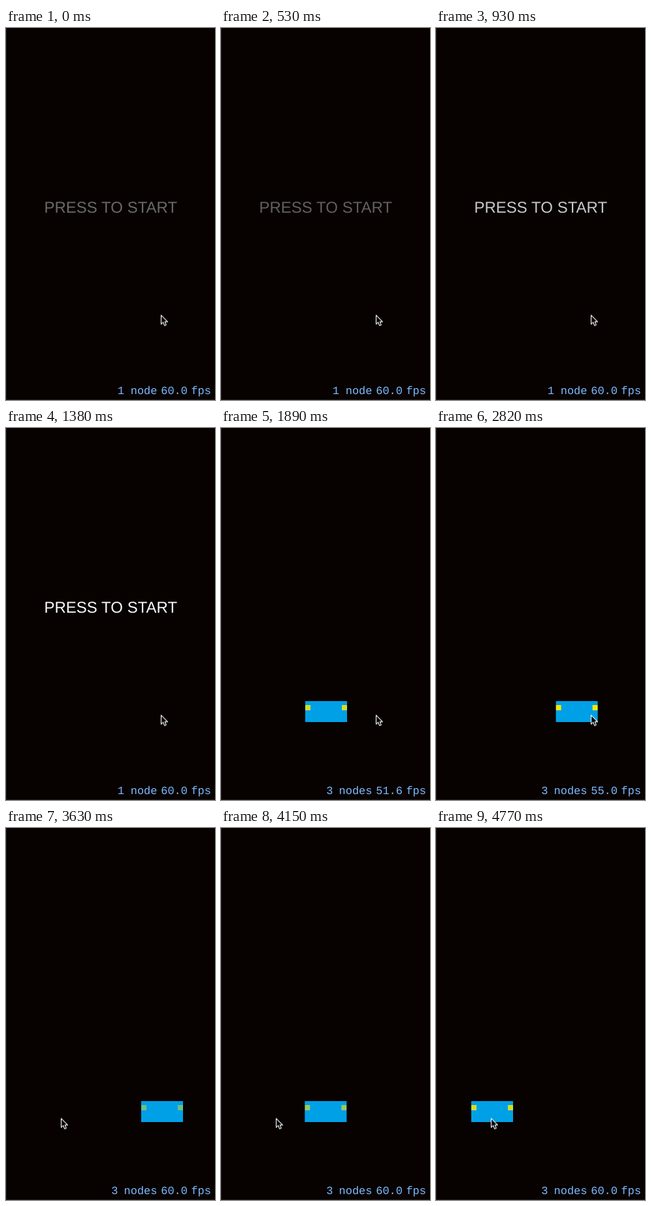
An HTML page that plays this animation: 320x568 px, repeating every 4870 ms.

```html
<!DOCTYPE html>
<html lang="en">
<head>
<meta charset="utf-8">
<title>Press to start</title>
<style>
  html, body { margin: 0; width: 100%; height: 100%; overflow: hidden; background: #070200; }
  svg { display: block; width: 320px; height: 568px; text-rendering: geometricPrecision; }
  #prompt { font: 24px "Liberation Sans", Arial, sans-serif; fill: #fff; text-anchor: middle; }
  #stats { font: 17px "Liberation Mono", "Courier New", monospace; fill: #7fbaff; text-anchor: end; }
</style>
</head>
<body>
<svg viewBox="0 0 320 568">
  <rect width="320" height="568" fill="#070200"/>
  <path d="M.5 0V567.5H320" fill="none" stroke="#1e1b1a"/>
  <text id="prompt" x="160.3" y="282">PRESS TO START</text>
  <g id="ship">
    <rect y="417" width="64" height="32" fill="#00a0e6"/>
    <g id="lights" fill="#ffec00">
      <rect y="423" width="8" height="8"/>
      <rect x="56" y="423" width="8" height="8"/>
    </g>
  </g>
  <g id="stats"></g>
  <path id="cursor" d="M.5 .8V14.6L3.6 11.7 5.8 16.8 8.3 15.7 6.2 10.9H10.4Z"
        fill="#000" stroke="#fff" stroke-width="1.1" stroke-linejoin="round"/>
</svg>
<script>
const LOOP = 4870;
const START = 1440; // the game replaces the title screen
const $ = id => document.getElementById(id);

// steps: [time in ms, value, easing]; two steps at one time make a hard change
function play(el, prop, steps) {
  const frames = steps.map(([t, value, easing = "linear"]) =>
    ({ offset: t / LOOP, [prop]: value, easing }));
  el.animate(frames, { duration: LOOP, iterations: Infinity });
}

function show(el, from, to) {
  const steps = [[from, 1], [to, 1]];
  if (from > 0) steps.unshift([0, 0], [from, 0]);
  if (to < LOOP) steps.push([to, 0], [LOOP, 0]);
  play(el, "opacity", steps);
}

// triangle wave between 1 and 0, full at time peak
function pulse(from, to, peak, half) {
  const level = t => {
    const x = (t - peak) / half;
    return Math.abs(1 - (x - 2 * Math.floor(x / 2)));
  };
  const times = [from];
  for (let n = Math.floor((from - peak) / half) + 1; peak + n * half < to; n++) {
    times.push(peak + n * half);
  }
  return [...times, to].map(t => [t, level(t)]);
}

// texts that replace one another, right-aligned at x
function column(x, labels) {
  labels.forEach(([from, label], i) => {
    const text = document.createElementNS("http://www.w3.org/2000/svg", "text");
    text.setAttribute("x", x);
    text.setAttribute("y", 558.5);
    text.textContent = label;
    $("stats").append(text);
    show(text, from, i + 1 < labels.length ? labels[i + 1][0] : LOOP);
  });
}

const at = (x, y = 0) => `translate(${x}px, ${y}px)`;

play($("prompt"), "opacity", [...pulse(0, START, 372, 253), [START, 0], [LOOP, 0]]);

show($("ship"), START, LOOP);
play($("ship"), "transform", [
  [0, at(129)], [2128, at(129)], [3118, at(207)],
  [3660, at(207)], [4615, at(54)], [LOOP, at(54)]
]);
play($("lights"), "opacity", [[0, 1], ...pulse(1850, LOOP, 1850, 240)]);

play($("cursor"), "transform", [
  [0, at(237, 437.6)], [3330, at(237, 437.6), "ease-in-out"],
  [3580, at(84, 442.6)], [LOOP, at(84, 442.6)]
]);

column(172 + 9, [[0, "1"], [START, ""]]);
column(162 + 9.5, [[0, ""], [START, "3"]]);
column(231.5, [[0, "node"], [START, "nodes"]]);
column(278, [[0, "60.0"], [1670, "51.6"], [2280, "55.0"], [2890, "60.0"]]);
column(314, [[0, "fps"]]);
</script>
</body>
</html>
```
